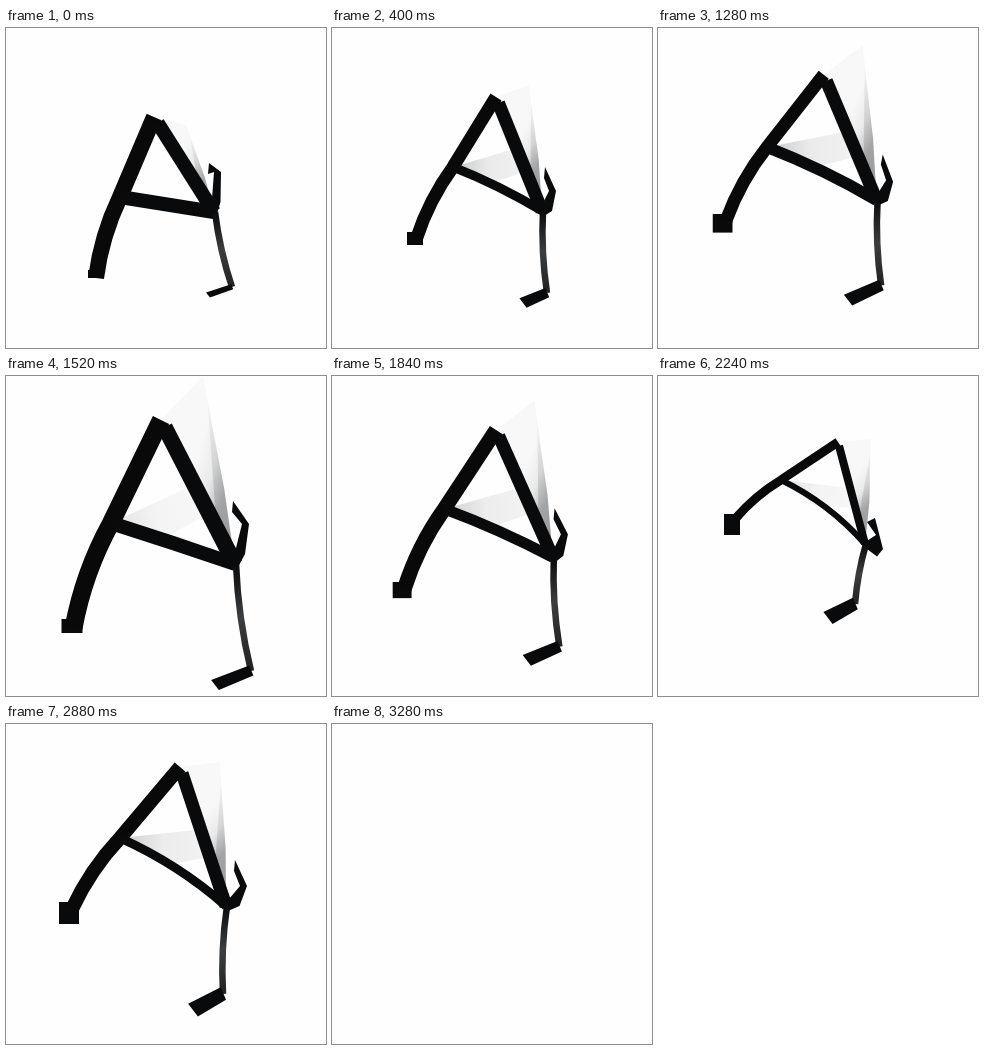
Recreate the animation shown at these times as an HTML page with a canvas. Size 320 px wide and 320 px high, loop 3.36 s.

```html
<!DOCTYPE html>
<html lang="en">
<head>
<meta charset="utf-8">
<title>Folding paper letter A</title>
<style>
  html, body { margin: 0; width: 100%; height: 100%; overflow: hidden; background: #fefefe; }
  canvas { display: block; width: 320px; height: 320px; }
</style>
</head>
<body>
<canvas id="stage" width="320" height="320"></canvas>
<script>
const ctx = document.getElementById('stage').getContext('2d');
const LOOP = 3360, STEP = 80, BLANK_FROM = 3280;
const INK = '#090a0b';

// Points: base, joint, peak, corner, hook tip, elbow, heel, toe, sheet tip.
// Sizes: base height, then widths of base, left strip, right strip, bar, toe.
const poses = [
  [90,250, 114,169, 148,89, 208,184, 203,135, 215,144, 226,259, 202,267, 180,97, 8,16,16,14,14,6],
  [83,217, 121,139, 164,69, 210,183, 213,139, 224,163, 215,265, 191,275, 197,57, 13,16,13,13,9,11],
  [66,124, 118,79, 183,56, 201,150, 219,132, 221,166, 187,200, 160,215, 216,53, 25,17,5,8,7,14],
  [66,257, 105,147, 155,44, 229,188, 227,125, 243,148, 245,295, 209,309, 197,0, 14,21,18,16,14,12],
  [74,159, 123,104, 180,66, 207,168, 217,142, 225,173, 197,228, 170,242, 213,63, 21,16,9,8,6,14],
  [63,200, 114,114, 174,43, 220,182, 229,136, 241,162, 217,270, 187,286, 214,38, 22,20,14,13,9,15]
];
const times = [0, 400, 960, 1520, 2240, 2880, 3200];

const clamp = (v, lo, hi) => Math.min(hi, Math.max(lo, v));
const mix = (a, b, t) => a + (b - a) * t;
const mixPoint = (a, b, t) => [mix(a[0], b[0], t), mix(a[1], b[1], t)];
const add = (p, x, y) => [p[0] + x, p[1] + y];

poses.push(poses[5].map((v, i) => mix(v, poses[3][i], 0.5)));

// Control point of a strip from a to b, bowed to its upper side.
function bowed(a, b, amount) {
  const [x, y] = mixPoint(a, b, 0.5);
  return [x + (b[1] - a[1]) * amount, y - (b[0] - a[0]) * amount];
}

function slope(key, i) {
  const a = Math.max(0, key - 1), b = Math.min(times.length - 1, key + 1);
  return (poses[b][i] - poses[a][i]) / (times[b] - times[a]);
}

function poseAt(ms) {
  let k = 0;
  while (k < times.length - 2 && ms >= times[k + 1]) k++;
  const span = times[k + 1] - times[k];
  const t = clamp((ms - times[k]) / span, 0, 1);
  const ease = t * t * (3 - 2 * t);
  return poses[k].map((v, i) =>
    mix(v, poses[k + 1][i], ease)
    + span * t * (1 - t) * (slope(k, i) * (1 - t) - slope(k + 1, i) * t));
}

function polygon(points, fill) {
  ctx.beginPath();
  points.forEach(p => ctx.lineTo(...p));
  ctx.closePath();
  ctx.fillStyle = fill;
  ctx.fill();
}

function strip(width, color, start, control, ...rest) {
  ctx.beginPath();
  ctx.moveTo(...start);
  if (control) ctx.quadraticCurveTo(...control, ...rest.shift());
  rest.forEach(p => ctx.lineTo(...p));
  ctx.lineWidth = Math.max(2, width);
  ctx.strokeStyle = color;
  ctx.stroke();
}

function gradient(a, b, ...stops) {
  const g = ctx.createLinearGradient(...a, ...b);
  stops.forEach((color, i) => g.addColorStop(i / (stops.length - 1), color));
  return g;
}

const shadow = alpha => `rgba(55,58,62,${alpha})`;

function drawSheets(joint, peak, corner, tip, tilt) {
  const fold = mixPoint(tip, corner, 0.6);
  polygon([peak, tip, add(fold, 2, 0), corner],
    gradient(mixPoint(peak, corner, 0.4), add(fold, 4, 0), shadow(0.03), shadow(0.1), shadow(0.34)));
  polygon([mixPoint(tip, corner, 0.15), add(fold, 2, 0), corner, mixPoint(peak, corner, 0.75)],
    gradient(tip, corner, shadow(0), shadow(0.28)));
  const pale = clamp(1 - Math.abs(tilt - 0.55) * 2.6, 0, 1);
  polygon([joint, mixPoint(peak, corner, 0.45), mixPoint(peak, corner, 0.65), mixPoint(joint, corner, 0.4)],
    gradient(joint, mixPoint(peak, corner, 0.55), shadow(0.34 * pale), shadow(0.12 * pale), shadow(0.08 * pale)));
}

function drawHook(corner, tip, elbow) {
  const turn = clamp(elbow[1] - corner[1] + 20, 0, 14) / 14;
  const low = add(mixPoint(elbow, corner, 0.5), 3, 10);
  polygon([
    tip, elbow, low, add(corner, 2, 5), add(corner, -3, 0),
    add(elbow, -7, -14 * turn),
    add(tip, mix(-1, -8, turn), mix(11, 4, turn))
  ], INK);
}

function drawLetter(pose) {
  const [base, joint, peak, corner, hook, elbow, heel, toe, tip] =
    Array.from({ length: 9 }, (_, i) => pose.slice(i * 2, i * 2 + 2));
  const [baseHeight, baseWidth, leftWidth, rightWidth, barWidth, toeWidth] = pose.slice(18);
  const tilt = (corner[1] - joint[1]) / (corner[0] - joint[0]);

  drawSheets(joint, peak, corner, tip, tilt);

  const ankle = add(base, (baseWidth - leftWidth) / 2, leftWidth / 2 - baseHeight);
  const tone = Math.round(clamp((10 - leftWidth) * 8, 9, 48));
  const leftInk = `rgb(${tone},${tone},${tone})`;
  polygon([
    add(base, -baseWidth / 2, 0), add(base, baseWidth / 2, 0),
    add(base, baseWidth / 2, -baseHeight), add(base, -baseWidth / 2, -baseHeight)
  ], INK);
  strip(leftWidth, leftInk, ankle, bowed(ankle, joint, 0.08), joint, peak);

  const length = Math.hypot(corner[0] - peak[0], corner[1] - peak[1]);
  strip(rightWidth, INK, mixPoint(peak, corner, rightWidth / 2 / length), null, corner);
  strip(barWidth, INK, joint, bowed(joint, corner, Math.max(0, tilt - 0.3) * 0.22), corner);
  drawHook(corner, hook, elbow);

  const thigh = add(corner, 1, 0);
  strip(6.5, gradient(thigh, heel, INK, '#3b3d3f', '#222'), thigh, bowed(thigh, heel, -0.05), heel);
  const half = toeWidth / 2;
  polygon([
    add(toe, -half * 0.65, -half * 0.85), add(toe, half * 0.65, half * 0.85),
    add(heel, half * 0.4, half * 0.75), add(heel, -half * 0.3, -half * 0.9)
  ], INK);
}

function render(ms) {
  ctx.fillStyle = '#fefefe';
  ctx.fillRect(0, 0, 320, 320);
  if (ms < BLANK_FROM) drawLetter(poseAt(ms));
}

const began = performance.now();
function tick() {
  const ms = (performance.now() - began) % LOOP;
  render(Math.floor(ms / STEP) * STEP);
  requestAnimationFrame(tick);
}
tick();
</script>
</body>
</html>
```
